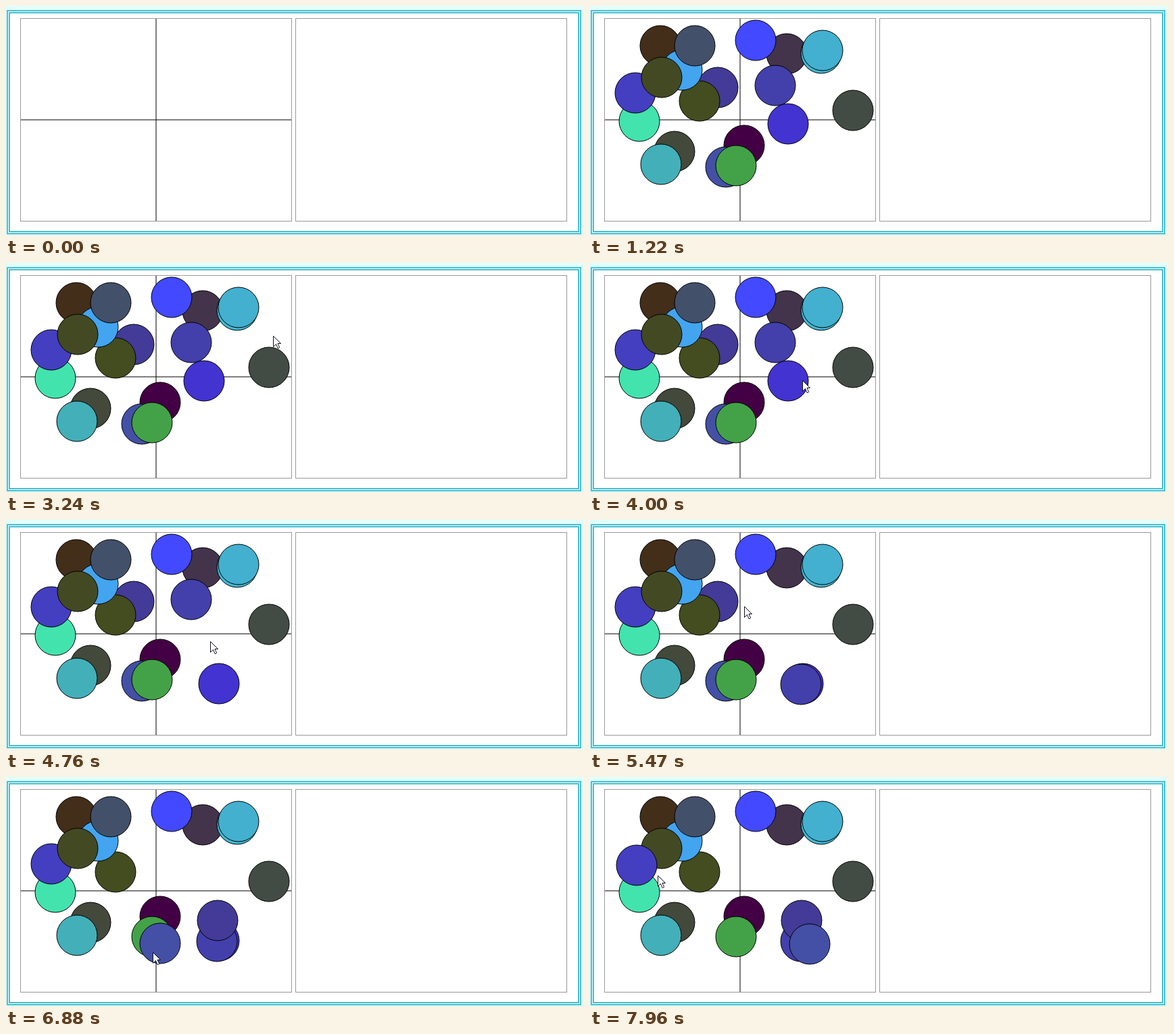
An HTML page with a canvas that plays this animation: 855 by 340 pixels, repeating every 8000 ms.

```html
<!DOCTYPE html>
<html>
<head>
<meta charset="utf-8">
<style>
html, body { margin: 0; width: 100%; height: 100%; overflow: hidden; background: #e0ffff; }
canvas { display: block; }
</style>
</head>
<body>
<canvas id="stage" width="855" height="340"></canvas>
<script>
const ctx = document.getElementById('stage').getContext('2d');
const LOOP = 8000, DOTS_AT = 1220, STEP = 78, RADIUS = 30;
const ENTRY = { x: 643, y: 17 };

// Back to front; every dot shares its red value, the tint gives green and blue
const dot = (x, y, tint) => ({ x, y, color: '#43' + tint });
const dots = [
  dot(104, 59, '2e1a'), dot(189, 121, '3b97'), dot(162, 141, '4d1f'), dot(136, 95, 'a4f0'),
  dot(155, 59, '506a'), dot(73, 171, 'e3ad'), dot(67, 129, '3fc0'), dot(106, 106, '4a23'),
  dot(291, 71, '344c'), dot(245, 51, '49ff'), dot(342, 70, 'b8d4'), dot(344, 66, 'b0cf'),
  dot(274, 118, '40ab'), dot(293, 175, '33d0'), dot(389, 155, '4c44'), dot(228, 207, '0044'),
  dot(201, 239, '50a6'), dot(216, 237, 'a247'), dot(125, 216, '493b'), dot(105, 235, 'afb9')
];

// A gesture visits its stops in equal times; the nearest dot follows for the first `held` legs
const gesture = (start, steps, held, ...stops) =>
  ({ start, steps, held, stops: stops.map(([x, y]) => ({ x, y })) });
const gestures = [
  gesture(1770, 8, 0, [427, 89]),
  gesture(2930, 11, 0, [356, 130]),
  gesture(3770, 6, 0, [321.5, 171], [299, 180]),
  gesture(4310, 8, 1, [321, 248], [283, 111]),
  gesture(5000, 9, 1, [321, 237], [233, 132], [218, 121]),
  gesture(5780, 11, 2, [334, 204], [342, 213], [190, 252]),
  gesture(6730, 11, 2, [223, 262], [314, 261], [146, 172]),
  gesture(7580, 4, 0, [89, 138], [98, 144]),
  gesture(7960, 1, 1, [100, 146])
];

const distance = (a, b) => Math.hypot(a.x - b.x, a.y - b.y);

// Point reached after a number of legs, which may be fractional
function along(points, legs) {
  const i = Math.min(Math.floor(legs), points.length - 2), f = legs - i;
  const a = points[i], b = points[i + 1];
  return { x: Math.round(a.x + (b.x - a.x) * f), y: Math.round(a.y + (b.y - a.y) * f) };
}

function sceneAt(t) {
  let stack = dots.map(d => ({ ...d })), pointer = ENTRY;
  for (const { start, steps, held, stops } of gestures) {
    if (t < start) break;
    const done = Math.min(steps, 1 + Math.floor((t - start) / STEP + 0.1));
    const legs = done / steps * stops.length;
    const points = [pointer, ...stops];
    if (held) {
      const grab = pointer;
      const near = stack.reduce((a, b) => distance(b, grab) < distance(a, grab) ? b : a);
      const hand = along(points, Math.min(legs, held));
      near.x += hand.x - grab.x;
      near.y += hand.y - grab.y;
      stack = [...stack.filter(d => d !== near), near];
    }
    pointer = along(points, legs);
  }
  return { stack, pointer };
}

function fill(color, x, y, w, h) {
  ctx.fillStyle = color;
  ctx.fillRect(x, y, w, h);
}

function line(x0, y0, x1, y1) {
  ctx.beginPath();
  ctx.moveTo(x0, y0);
  ctx.lineTo(x1, y1);
  ctx.stroke();
}

function drawBack() {
  fill('#e0ffff', 0, 0, 855, 340);
  fill('#fff', 1, 6, 850, 333);
  ctx.strokeStyle = '#46bfd0';
  ctx.lineWidth = 2;
  for (const inset of [1, 4]) ctx.strokeRect(1 + inset, 6 + inset, 850 - 2 * inset, 333 - 2 * inset);
  ctx.strokeStyle = '#999';
  ctx.lineWidth = 1;
  for (const x of [21.5, 428.5]) ctx.strokeRect(x, 18.5, 401, 301);
  ctx.strokeStyle = '#000';
  line(222, 19, 222, 319);
  line(22, 169, 422, 169);
}

function drawDot({ x, y, color }) {
  ctx.beginPath();
  ctx.arc(x, y, RADIUS, 0, 2 * Math.PI);
  ctx.fillStyle = color;
  ctx.fill();
  ctx.strokeStyle = '#000';
  ctx.stroke();
}

const arrow = new Path2D('M.5 .5V16.5L4.5 12.5L7 18.5H8.5L9.5 17L7 11.5H11.5Z');

function drawPointer({ x, y }) {
  ctx.save();
  ctx.translate(x, y);
  ctx.fillStyle = '#fff';
  ctx.strokeStyle = '#112';
  ctx.fill(arrow);
  ctx.stroke(arrow);
  ctx.restore();
}

function draw(t) {
  const { stack, pointer } = sceneAt(t);
  drawBack();
  if (t >= DOTS_AT) stack.forEach(drawDot);
  if (t >= gestures[0].start) drawPointer(pointer);
}

const begin = performance.now();
function tick() {
  draw((performance.now() - begin) % LOOP);
  requestAnimationFrame(tick);
}
tick();
</script>
</body>
</html>
```
